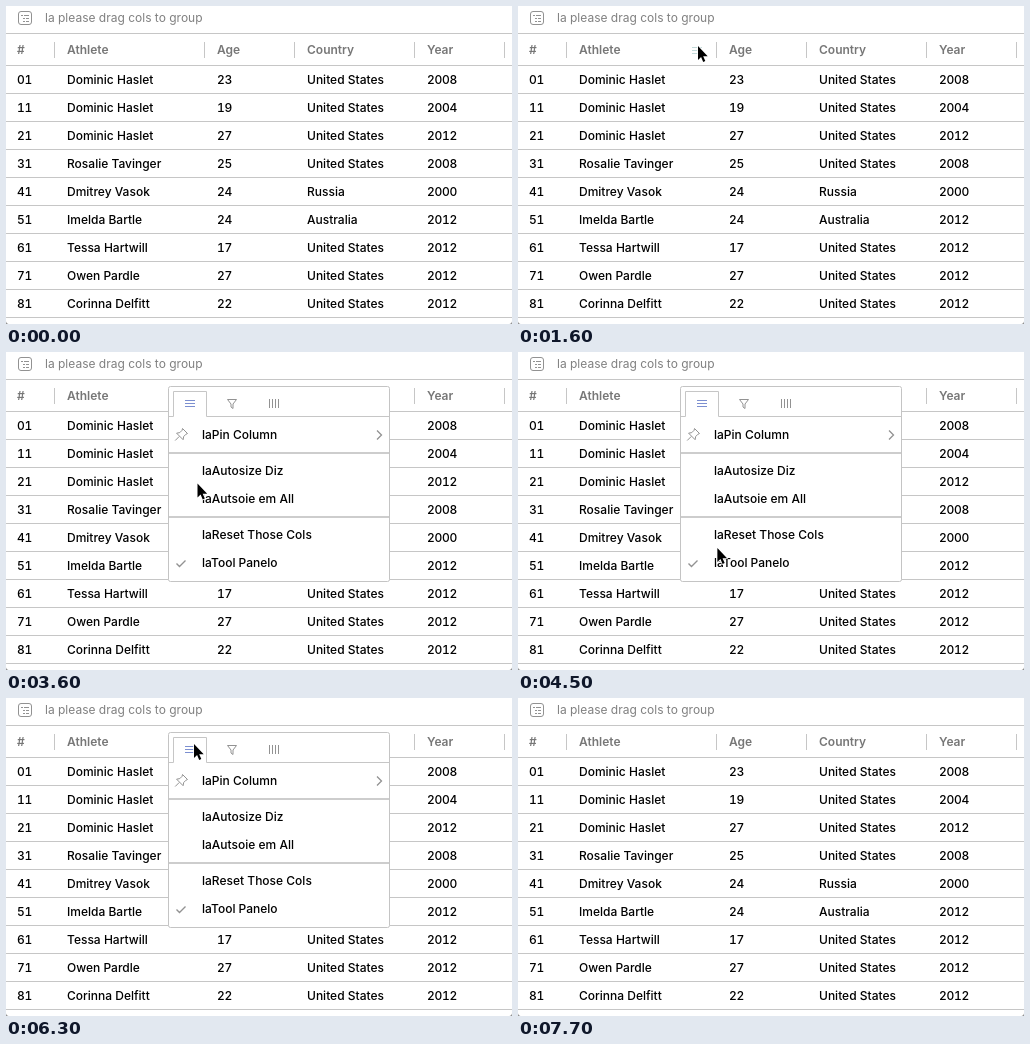
These frames come from a looping animation (506x318 px, 7.8 s). An HTML page:

```html
<!DOCTYPE html>
<html lang="en">
<head>
<meta charset="utf-8">
<title>Grid column menu</title>
<style>
  html, body { margin: 0; width: 100%; height: 100%; overflow: hidden; background: #fff; }
  svg { display: block; width: 506px; height: 318px; }
  text { font: 500 12px Inter, "Liberation Sans", sans-serif; fill: #000; white-space: pre; }
  .num { font-feature-settings: "tnum"; letter-spacing: -0.3px; }
  .head { font-weight: 600; fill: #777; }
  .hint { font-weight: 400; fill: #808080; }
  .line { stroke: #c6c6c6; fill: none; }
  .icon { stroke: #929292; fill: none; }
</style>
</head>
<body>
<svg id="stage" viewBox="0 0 506 318" xmlns="http://www.w3.org/2000/svg">
  <rect width="506" height="318" fill="#fff"/>
  <g class="icon">
    <rect x="12.5" y="5.5" width="13" height="13" rx="2.5"/>
    <path d="M15 9.5h2m1 0h5M17 12.5h2m1 0h3M17 15.5h2m1 0h3"/>
  </g>
  <text class="hint" x="39" y="16">la please drag cols to group</text>
  <g id="table"></g>
  <path id="handle" d="M174 41.5h10m-10 3h10m-10 3h10" stroke="#86b5b4"/>
  <g id="menu">
    <rect x="162.5" y="34.5" width="221" height="195" rx="2" fill="#fff" stroke="#c4c4c4"/>
    <path class="line" d="M163 64.5h4.5v-25h33v25h183"/>
    <path d="M179 48.5h10m-10 3h10m-10 3h10" stroke="#7c8fd0"/>
    <g class="icon">
      <path d="M221.5 47.5h9l-3.5 4.5v4.5l-2-1.5v-3z"/>
      <path d="M263.5 47v9m3-9v9m3-9v9m3-9v9"/>
      <path d="M176.5 76.5l5 5-1.5.7-2.3 2.3-.6 3.2-6.5-6.5 3.2-.6 2.3-2.3zm-3.3 8l-4 4"/>
      <path d="M371 78.5l4.5 4.5-4.5 4.5" stroke-width="1.3"/>
      <path d="M170.5 211.5l3 3 6-6" stroke-width="1.4"/>
    </g>
    <path d="M163 101h220m-220 64h220" stroke="#cdcdcd" stroke-width="2"/>
  </g>
  <path d="M0 315.5V318h2.5Q.3 317.7 0 315.5zM506 315.5V318h-2.5q2.2-.3 2.5-2.5z" fill="#888"/>
  <path id="cursor" d="M0 0V14L3.1 11L5.2 16L7.3 15.1L5.2 10.2H9.7Z"
        fill="#000" stroke="#fff" stroke-width="1.6" stroke-linejoin="round" paint-order="stroke"/>
</svg>
<script>
const LOOP = 7800, STEP = 100, ROW = 28;
const $ = id => document.getElementById(id);

function add(parent, tag, attrs, content = "") {
  const node = document.createElementNS("http://www.w3.org/2000/svg", tag);
  for (const key in attrs) node.setAttribute(key, attrs[key]);
  node.textContent = content;
  $(parent).appendChild(node);
}

const columns = [11, 61, 211, 301, 421];
const rows = `Dominic Haslet,23,United States,2008
Dominic Haslet,19,United States,2004
Dominic Haslet,27,United States,2012
Rosalie Tavinger,25,United States,2008
Dmitrey Vasok,24,Russia,2000
Imelda Bartle,24,Australia,2012
Tessa Hartwill,17,United States,2012
Owen Pardle,27,United States,2012
Corinna Delfitt,22,United States,2012`.split("\n");
const items = ["laPin Column", "laAutosize Diz", "laAutsoie em All", "laReset Those Cols", "laTool Panelo"];

function addRow(line, y, cls) {
  line.split(",").forEach((cell, i) =>
    add("table", "text", { x: columns[i], y, class: cls || (isNaN(cell) ? "" : "num") }, cell));
}

function build() {
  let lines = "M0 27.5h506";
  for (let i = 0; i <= rows.length; i++) lines += `M0 ${59.5 + ROW * i}h506`;
  for (const x of [...columns.slice(1), 511]) lines += `M${x - 12.5} 36v16`;
  add("table", "path", { d: lines, class: "line" });
  addRow("#,Athlete,Age,Country,Year", 48, "head");
  rows.forEach((row, i) => addRow(`${i}1,${row}`, 78 + ROW * i));
  // a divider sits before every odd item
  items.forEach((label, i) => add("menu", "text", { x: 196, y: 87 + 32 * i + 4 * (i % 2) }, label));
}

// cursor stops: time, x, y
const stops = [
  [700, 262, 322], [1600, 180, 40], [2900, 184, 57], [4300, 199, 206],
  [5500, 204, 71], [6300, 188, 46], [7000, 191, 52], [7500, 262, 322]
];

const ramp = (t, from, to) => Math.min(1, Math.max(0, (t - from) / (to - from)));
const ease = p => p * p * (3 - 2 * p);

function cursorAt(t) {
  const next = stops.findIndex(stop => stop[0] > t);
  if (next < 1) return null;
  const [[t0, x0, y0], [t1, x1, y1]] = stops.slice(next - 1, next + 1);
  const p = ease(ramp(t, t0, t1));
  return [x0 + (x1 - x0) * p, y0 + (y1 - y0) * p];
}

function draw(t) {
  const pos = cursorAt(t);
  $("cursor").style.display = pos ? "" : "none";
  if (pos) $("cursor").setAttribute("transform", `translate(${pos})`);
  $("handle").style.opacity = ramp(t, 1400, 1800) - ramp(t, 6500, 6800);
  $("menu").style.opacity = t < 6500 ? ramp(t, 1900, 2100) : 0;
}

function tick(now) {
  draw(Math.floor((now % LOOP) / STEP) * STEP);
  requestAnimationFrame(tick);
}

build();
draw(0);
requestAnimationFrame(tick);
</script>
</body>
</html>
```
